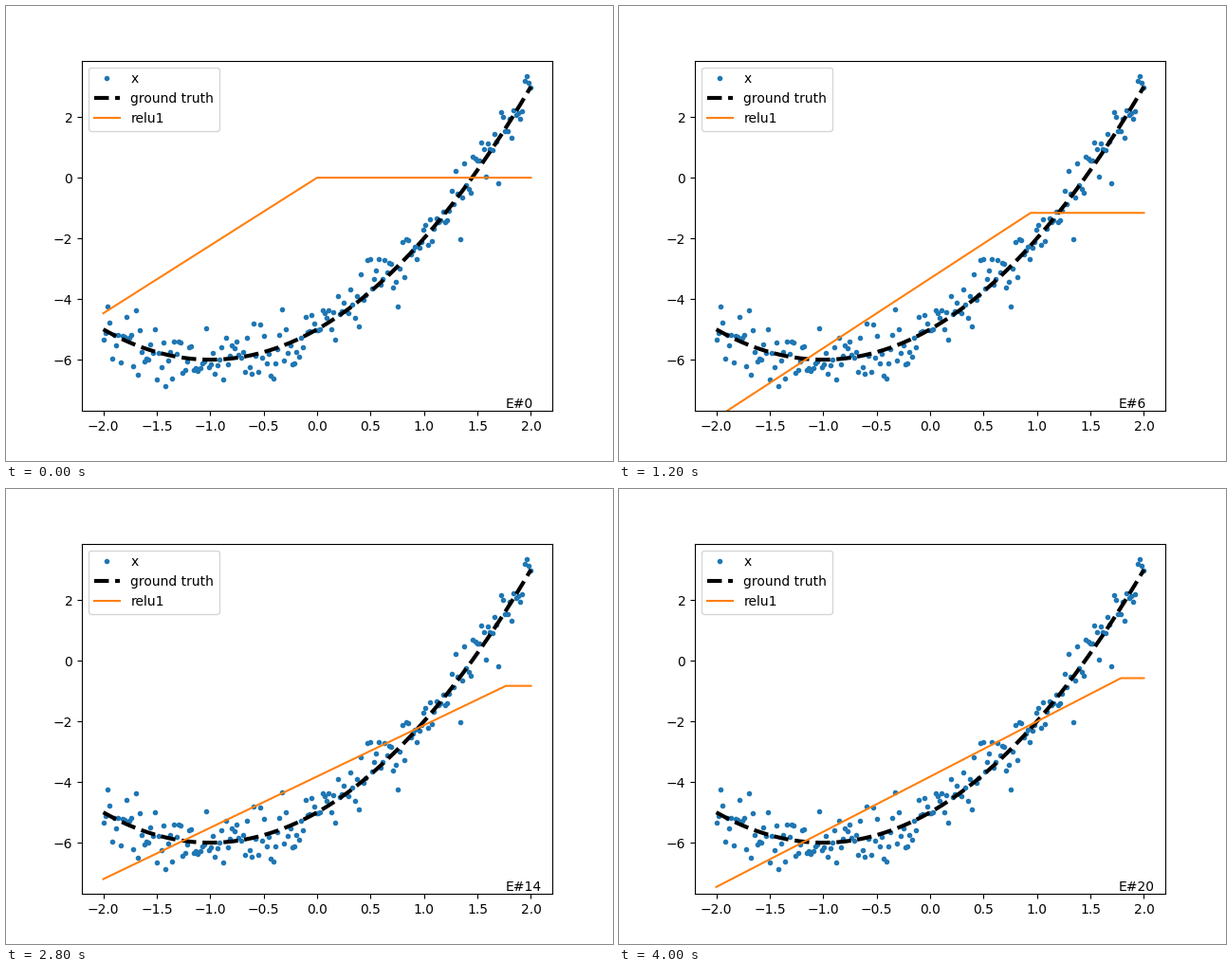
Animation of 640 by 480 pixels, one loop 6200 ms. Source, as a matplotlib script:

```python
import numpy as np
import matplotlib.pyplot as plt
from matplotlib.animation import FuncAnimation

FRAMES, STEP_MS, LAST_EPOCH = 31, 200, 20

# Key poses of the fitted line: epoch, knee x, flat height, left end height
POSES = np.array([
    (0, 0, 0, -4.47),
    (1, 0.15, -0.475, -7.89),
    (2, 0.32, -0.71, -8.08),
    (4, 0.62, -1.0, -8.0),
    (6, 0.94, -1.16, -7.92),
    (8, 1.31, -1.13, -7.43),
    (10, 1.656, -1.04, -7.1),
    (14, 1.766, -0.83, -7.2),
    (20, 1.785, -0.575, -7.46),
])


def truth(x):
    return x ** 2 + 2 * x - 5


def fit(epoch):
    """Corner points of the fitted line after an epoch."""
    knee, flat, left = (np.interp(epoch, POSES[:, 0], column)
                        for column in POSES.T[1:])
    return [-2, knee, 2], [left, flat, flat]


x = np.linspace(-2, 2, 200)
noise = np.random.default_rng(4).normal(0, 0.5, x.size)
y = np.clip(truth(x) + noise, -7.15, 3.35)

fig, ax = plt.subplots(figsize=(6.4, 4.8), dpi=100)
ax.plot(x, y, ".", label="x")
ax.plot(x, truth(x), "k--", lw=3, label="ground truth")
line, = ax.plot(*fit(0), color="C1", label="relu1")
note = ax.text(0.9, 0.01, "E#0", transform=ax.transAxes)
ax.set_xlim(-2.2, 2.2)
ax.set_ylim(-7.69, 3.86)
ax.legend(loc="upper left")


def draw(i):
    epoch = min(i, LAST_EPOCH)
    line.set_data(*fit(epoch))
    note.set_text(f"E#{epoch}")
    return line, note


anim = FuncAnimation(fig, draw, frames=FRAMES, interval=STEP_MS,
                     repeat=True, repeat_delay=0)
plt.show()
```
